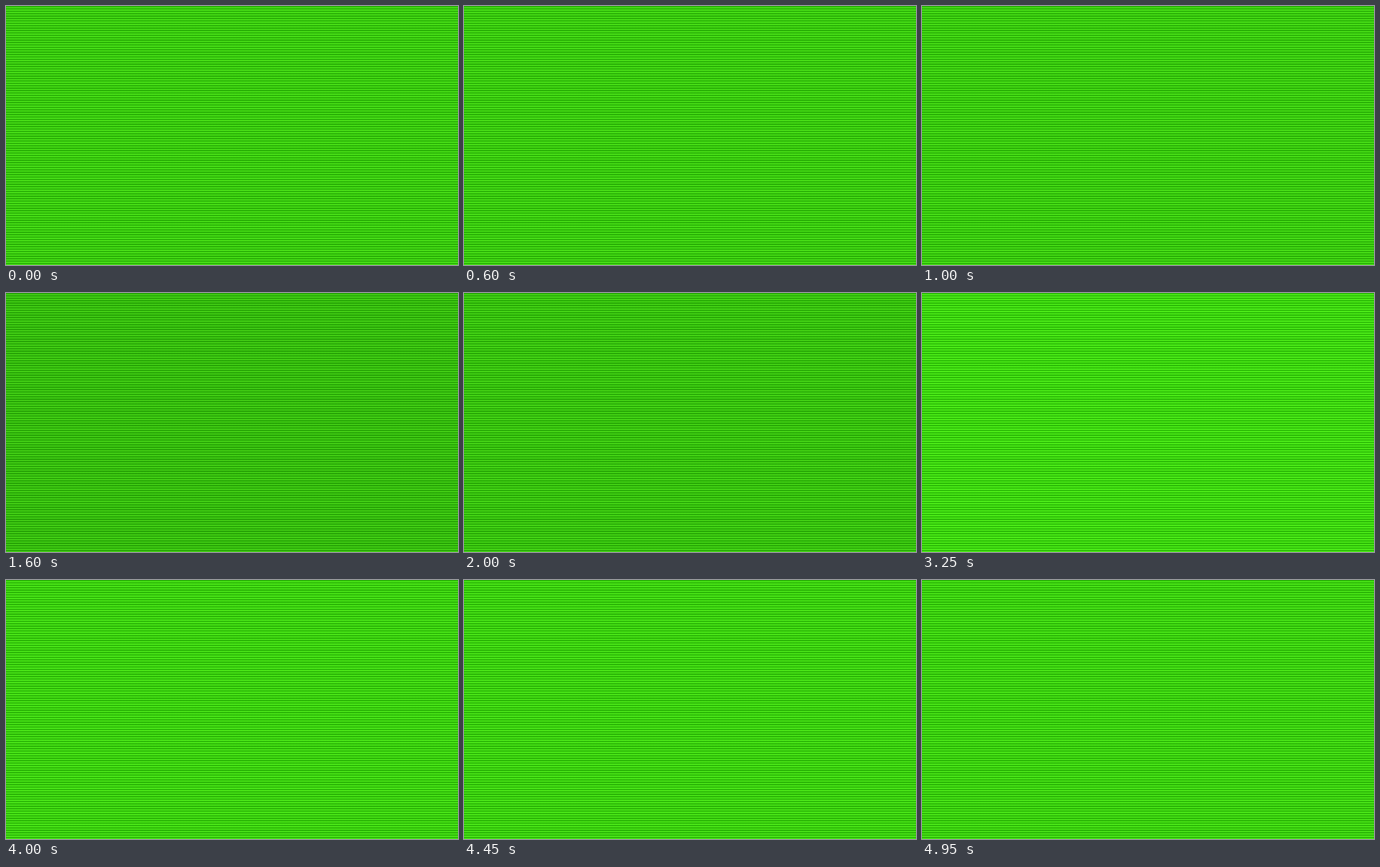
Write an HTML page that moves like this. It is 600 px wide and 345 px high and loops after 5000 ms.

```html
<!DOCTYPE html>
<html>
<head>
<meta charset="utf-8">
<style>
html, body { margin: 0; width: 100%; height: 100%; overflow: hidden; background: #3ac90d; }
svg { display: block; }
</style>
</head>
<body>
<svg id="screen" width="600" height="345" viewBox="0 0 600 345">
  <defs>
    <linearGradient id="scan" gradientUnits="userSpaceOnUse" spreadMethod="repeat"
      x1="0" y1="0.65" x2="0" y2="3.85">
      <stop offset="0" stop-color="#1ea000"/>
      <stop offset=".5" stop-color="#52ee1c"/>
      <stop offset="1" stop-color="#1ea000"/>
    </linearGradient>
  </defs>
  <rect width="600" height="345" fill="url(#scan)"/>
</svg>
<script>
const LOOP = 5000, STEP = 50;
const screen_ = document.getElementById('screen');

// Glow of the screen over the loop: [ms, brightness].
const glow = [[0, 1], [350, 1], [1000, 1], [1600, .93], [2450, .99],
  [3250, 1.06], [4000, 1.03], [4950, 1.03], [5000, 1]];

function level(t) {
  const i = glow.findIndex(([ms]) => ms > t);
  const [t0, a] = glow[i - 1], [t1, b] = glow[i];
  const p = (t - t0) / (t1 - t0);
  return a + (b - a) * p * p * (3 - 2 * p);
}

function draw(ms) {
  const t = Math.floor(ms % LOOP / STEP) * STEP;
  screen_.style.filter = `brightness(${level(t).toFixed(4)})`;
}

function tick() {
  draw(performance.now());
  requestAnimationFrame(tick);
}
tick();
</script>
</body>
</html>
```
